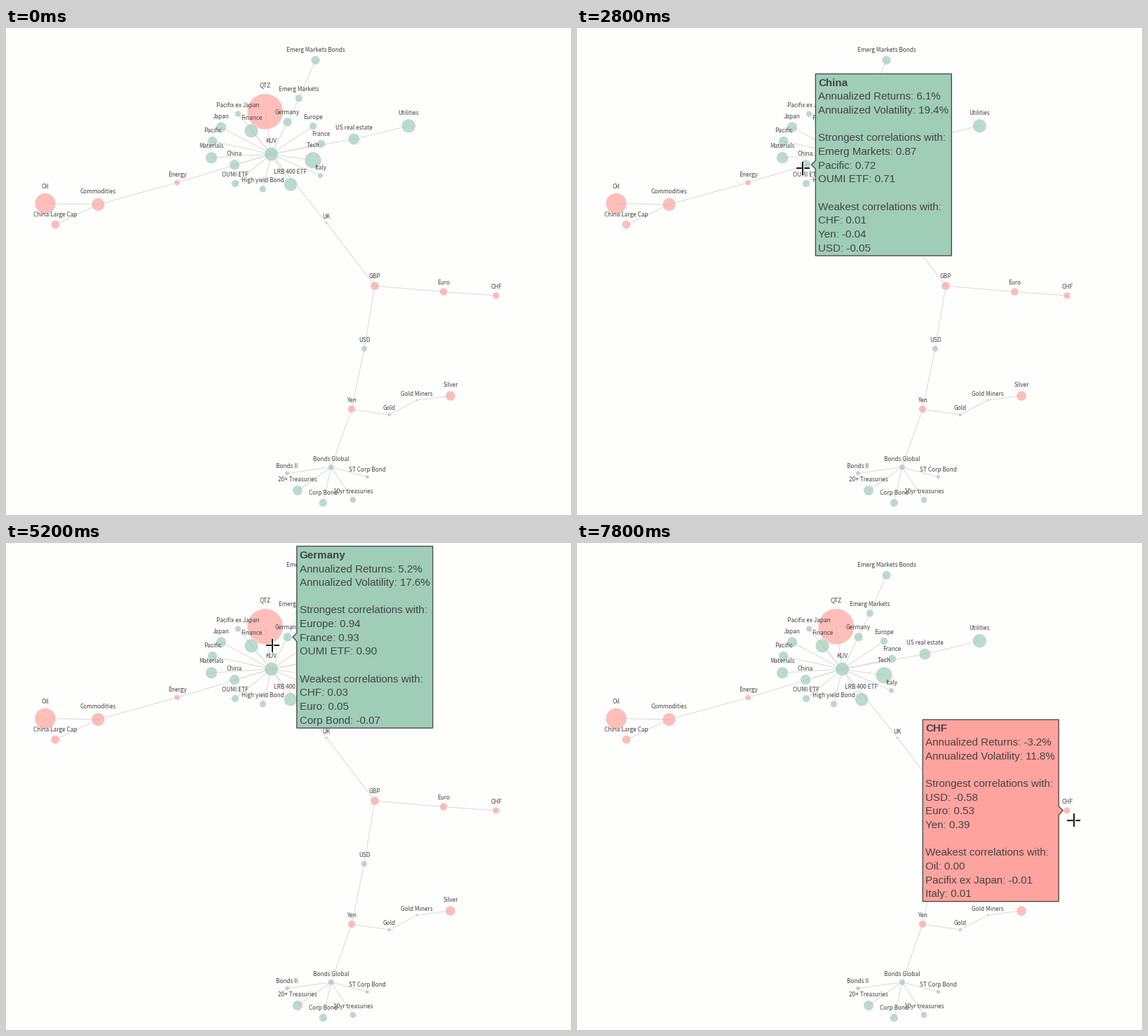
Recreate the animation shown at these times as a matplotlib script. Size 806x695 px, loop 8000 ms.

```python
import numpy as np
import matplotlib.pyplot as plt
from matplotlib.animation import FuncAnimation
from matplotlib.patches import Circle, Polygon
from matplotlib.patheffects import withStroke

W, H, DPI = 806, 695, 100
STEP, FRAMES = 200, 40
GREEN, RED, INK, PAPER = "#9fcdb8", "#ffa39e", "#444444", "#fefefd"

# name: x, y, radius
GAINERS = {
    "Emerg Markets Bonds": (441.5, 46, 6.5),
    "Emerg Markets": (417.7, 100.3, 5.5),
    "Pacifix ex Japan": (331, 122.5, 4.5),
    "Japan": (307, 141.5, 7.5),
    "Finance": (350, 146.7, 10),
    "Germany": (401.5, 134.3, 6.5),
    "Europe": (438, 140, 5.5),
    "France": (449.5, 165.3, 6),
    "US real estate": (496.3, 158.5, 8.3),
    "Utilities": (574.3, 139.7, 10),
    "Pacific": (294.5, 161.5, 7),
    "Materials": (293, 185.2, 8.5),
    "China": (326, 195.2, 7.5),
    "KUV": (378.5, 180, 10),
    "Tech": (438, 188.7, 12),
    "Italy": (448.5, 210.5, 4),
    "LRB 400 ETF": (406, 223.2, 9.7),
    "High yield Bond": (366.3, 229.8, 5),
    "OUMI ETF": (327, 222, 5.5),
    "UK": (457.2, 278, 2),
    "USD": (511, 457.7, 4.5),
    "Bonds Global": (463.8, 626.8, 4.5),
    "Bonds II": (401, 635.5, 3.4),
    "20+ Treasuries": (416, 660, 7.3),
    "Corp Bond": (452.3, 677.6, 6),
    "10yr treasuries": (495, 673.5, 4.7),
    "ST Corp Bond": (515.3, 640.6, 3),
}
LOSERS = {
    "QTZ": (369.7, 119.3, 25.7),
    "Energy": (244, 220.6, 4.2),
    "Commodities": (131.4, 251.8, 9.5),
    "Oil": (56, 250.5, 15),
    "China Large Cap": (70.3, 280.6, 6.3),
    "GBP": (526, 368, 6.3),
    "Euro": (624.2, 376.5, 5.7),
    "CHF": (699, 381.8, 5),
    "Yen": (493, 544, 5.5),
    "Gold": (546.6, 552, 2.6),
    "Gold Miners": (586.2, 531, 1.8),
    "Silver": (634, 525, 7.2),
}
NODES = {**LOSERS, **GAINERS}

CHAINS = [
    ["Emerg Markets Bonds", "Emerg Markets", "Germany"],
    ["KUV", "US real estate", "Utilities"],
    ["KUV", "Energy", "Commodities", "Oil"],
    ["Commodities", "China Large Cap"],
    ["KUV", "UK", "GBP", "Euro", "CHF"],
    ["GBP", "USD", "Yen", "Gold", "Gold Miners", "Silver"],
    ["Yen", "Bonds Global"],
]
HUBS = {
    "KUV": ["QTZ", "Pacifix ex Japan", "Japan", "Finance", "Germany", "Europe",
            "France", "Pacific", "Materials", "China", "Tech", "Italy",
            "LRB 400 ETF", "High yield Bond", "OUMI ETF"],
    "Bonds Global": ["Bonds II", "20+ Treasuries", "Corp Bond",
                     "10yr treasuries", "ST Corp Bond"],
}

# name: returns, volatility, strongest, weakest
FACTS = {
    "LRB 400 ETF": ("13.2%", "12.9%", "KUV: 0.96|Tech: 0.91|Finance: 0.87",
                    "USD: -0.03|Yen: -0.05|Silver: 0.06"),
    "High yield Bond": ("5.1%", "11.2%", "LRB 400 ETF: 0.71|KUV: 0.68|Europe: 0.66",
                        "Gold: 0.03|CHF: 0.04|USD: -0.06"),
    "OUMI ETF": ("4.4%", "14.7%", "Europe: 0.95|France: 0.91|UK: 0.91",
                 "CHF: 0.02|ST Corp Bond: 0.05|Corp Bond: -0.06"),
    "China": ("6.1%", "19.4%", "Emerg Markets: 0.87|Pacific: 0.72|OUMI ETF: 0.71",
              "CHF: 0.01|Yen: -0.04|USD: -0.05"),
    "Pacific": ("6.8%", "14.1%", "Japan: 0.93|OUMI ETF: 0.87|Pacifix ex Japan: 0.84",
                "USD: -0.00|Euro: -0.02|Corp Bond: -0.03"),
    "Pacifix ex Japan": ("3.6%", "16.3%", "Pacific: 0.84|OUMI ETF: 0.83|Europe: 0.79",
                         "CHF: -0.01|Corp Bond: 0.02|Yen: -0.05"),
    "Finance": ("13.0%", "15.7%", "KUV: 0.87|LRB 400 ETF: 0.87|Materials: 0.74",
                "Silver: -0.05|Gold Miners: -0.07|GBP: 0.12"),
    "Germany": ("5.2%", "17.6%", "Europe: 0.94|France: 0.93|OUMI ETF: 0.90",
                "CHF: 0.03|Euro: 0.05|Corp Bond: -0.07"),
    "US real estate": ("9.3%", "13.4%", "LRB 400 ETF: 0.63|Utilities: 0.62|KUV: 0.59",
                       "Euro: -0.01|USD: -0.02|CHF: -0.04"),
    "Utilities": ("12.3%", "14.3%", "US real estate: 0.62|LRB 400 ETF: 0.42|KUV: 0.40",
                  "Yen: 0.04|Oil: 0.07|CHF: 0.07"),
    "CHF": ("-3.2%", "11.8%", "USD: -0.58|Euro: 0.53|Yen: 0.39",
            "Oil: 0.00|Pacifix ex Japan: -0.01|Italy: 0.01"),
}
# start time of each hover, in ms
HOVERS = [(0, None), (800, "LRB 400 ETF"), (1400, "High yield Bond"),
          (1800, "OUMI ETF"), (2600, "China"), (3200, "Pacific"),
          (4200, "Pacifix ex Japan"), (4600, "Finance"), (5200, "Germany"),
          (5600, "US real estate"), (6200, "Utilities"), (7400, None), (7600, "CHF")]
# pointer stops: ms, x, y
PATH = np.array([(200, 470, 330), (1000, 410, 228), (1600, 372, 236),
                 (2200, 325.5, 230), (2800, 322, 200), (3400, 294.5, 158.5),
                 (4000, 294.5, 158.5), (4400, 330, 124), (4800, 352, 150),
                 (5200, 380, 146), (5400, 405, 136), (5600, 534, 131),
                 (6400, 574, 140), (6800, 576, 142), (7000, 588, 165),
                 (7800, 708.5, 395.5)])

TIP_W, TIP_H, ARROW, LINE = 194, 259.5, 6, 19.66


def px(n):
    return n * 72 / DPI


fig = plt.figure(figsize=(W / DPI, H / DPI), dpi=DPI, facecolor=PAPER)
ax = fig.add_axes([0, 0, 1, 1])
ax.set_xlim(0, W)
ax.set_ylim(H, 0)
ax.axis("off")


def link(a, b):
    (x0, y0, _), (x1, y1, _) = NODES[a], NODES[b]
    ax.plot([x0, x1], [y0, y1], color="#dcdcdc", lw=px(1.1), zorder=1)


for chain in CHAINS:
    for a, b in zip(chain, chain[1:]):
        link(a, b)
for hub, spokes in HUBS.items():
    for name in spokes:
        link(hub, name)

for name, (x, y, r) in NODES.items():
    fill = GREEN if name in GAINERS else RED
    ax.add_patch(Circle((x, y), r, fc=fill, ec="none", alpha=0.7, zorder=2))
    ax.add_patch(Circle((x, y), r, fc="none", ec="white", lw=px(1), alpha=0.7, zorder=2))
    ax.text(x, y - 3.9 - 1.2 * r, name, size=px(8.25), color=INK, ha="center",
            va="baseline", family="Noto Sans CJK JP", zorder=3)

tip = ax.add_patch(Polygon([(0, 0)], closed=True, ec=INK, lw=px(1.3),
                           joinstyle="miter", zorder=4))
rows = [ax.text(0, 0, "", size=px(15.1), color=INK, family="Liberation Sans",
                weight="normal" if i else "bold", va="baseline", zorder=5)
        for i in range(13)]
halo = [withStroke(linewidth=px(3.4), foreground=PAPER)]
cross = [ax.plot([], [], color="black", lw=px(1.8), solid_capstyle="butt",
                 path_effects=halo, zorder=z)[0] for z in (6, 6)]


def tip_lines(name):
    gain, risk, strong, weak = FACTS[name]
    return [name, "Annualized Returns: " + gain, "Annualized Volatility: " + risk, "",
            "Strongest correlations with:", *strong.split("|"), "",
            "Weakest correlations with:", *weak.split("|")]


def show_tip(name):
    tip.set_visible(name is not None)
    for row in rows:
        row.set_visible(name is not None)
    if name is None:
        return None
    x, y, r = NODES[name]
    side = 1 if x + r + TIP_W + ARROW < W else -1
    point = x + side * (r + 0.8)
    near = point + side * ARROW
    far = near + side * TIP_W
    top, bottom = y - TIP_H / 2, y + TIP_H / 2
    tip.set_xy([(point, y), (near, y - ARROW), (near, top), (far, top),
                (far, bottom), (near, bottom), (near, y + ARROW)])
    tip.set_facecolor(GREEN if name in GAINERS else RED)
    left = min(near, far)
    for i, (row, text) in enumerate(zip(rows, tip_lines(name))):
        row.set_text(text)
        row.set_position((left + 4, top + 17.3 + LINE * i))
    return left, top


def draw(frame):
    t = frame * STEP
    corner = show_tip([name for start, name in HOVERS if start <= t][-1])
    x, y = (np.interp(t, PATH[:, 0], PATH[:, k]) for k in (1, 2))
    covered = (corner is not None and 0 < x - corner[0] < TIP_W
               and 0 < y - corner[1] < TIP_H)
    for arm, (dx, dy) in zip(cross, ((9.5, 0), (0, 9.5))):
        arm.set_data([x - dx, x + dx], [y - dy, y + dy])
        arm.set_visible(t > 0)
        arm.set_alpha(0.65 if covered else 1)
        arm.set_path_effects([] if covered else halo)
    return [tip, *rows, *cross]


anim = FuncAnimation(fig, draw, frames=FRAMES, interval=STEP, repeat=True,
                     repeat_delay=0, init_func=lambda: draw(0), blit=False)
plt.show()
```
